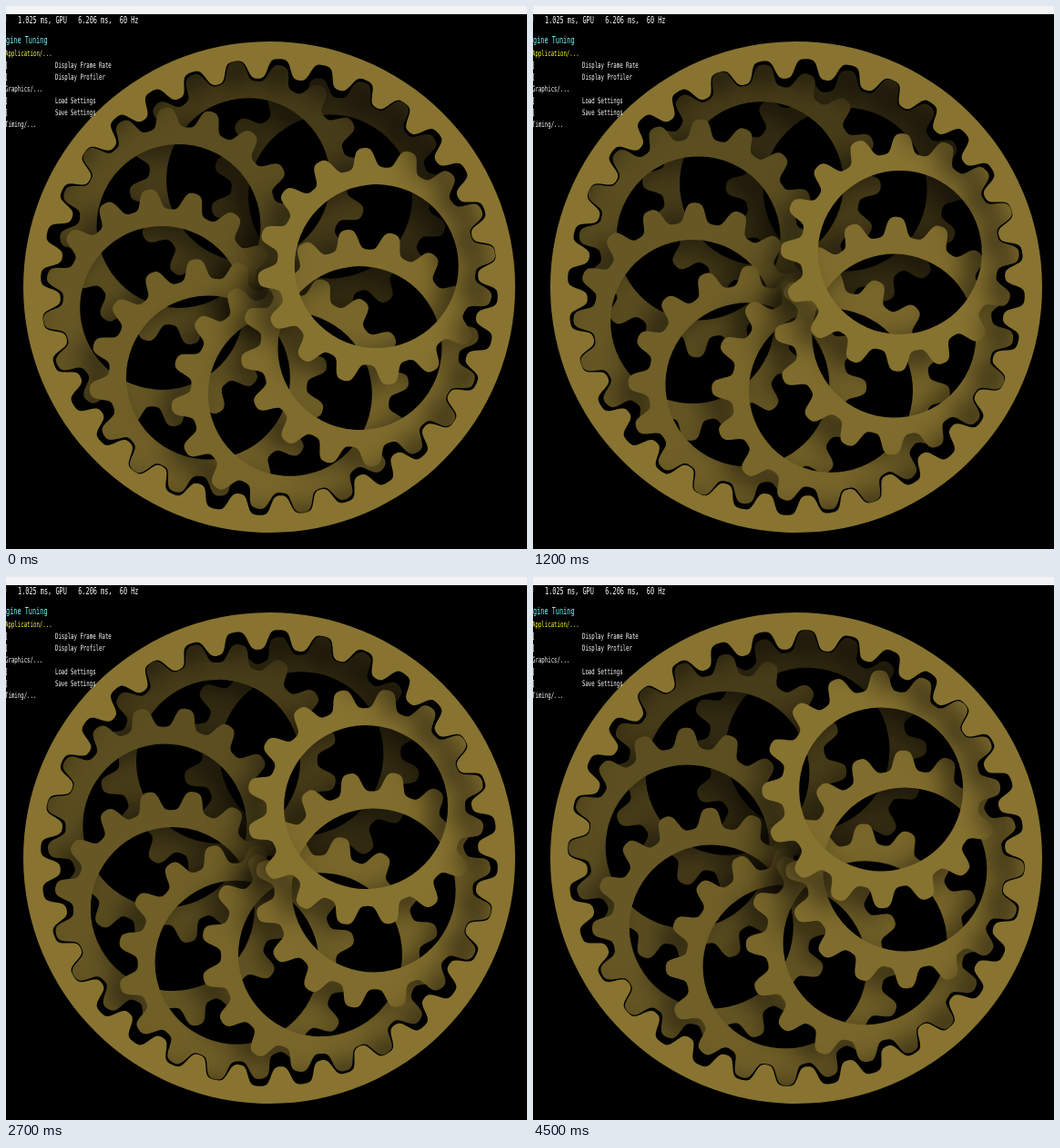
Write an HTML page with a canvas that moves like this. It is 572 px wide and 597 px high and loops after 4600 ms.

```html
<!DOCTYPE html>
<html>
<head>
<meta charset="utf-8">
<style>
html, body { margin: 0; width: 100%; height: 100%; overflow: hidden; background: #000; }
canvas, svg { position: absolute; left: 0; top: 0; }
text { font-family: "DejaVu Sans Mono", monospace; font-size: 8.8px; fill: #fff; white-space: pre; }
.big { font-size: 10.6px; }
</style>
</head>
<body>
<canvas width="572" height="597"></canvas>
<svg width="572" height="597">
  <rect width="572" height="9" fill="#f3f3f5"/>
  <g transform="scale(.65 1)">
    <text class="big" x="-5.5" y="19">U   1.025 ms, GPU   6.206 ms,  60 Hz</text>
    <text class="big" x="0" y="41" style="fill:#7ff">gine Tuning</text>
    <text x="-1.5" y="55" style="fill:#ff3">Application/...</text>
    <text x="-2" y="68">[</text><text x="83" y="68">Display Frame Rate</text>
    <text x="-2" y="81">[</text><text x="83" y="81">Display Profiler</text>
    <text x="-1.5" y="94">Graphics/...</text>
    <text x="-2" y="107">[</text><text x="83" y="107">Load Settings</text>
    <text x="-2" y="120">[</text><text x="83" y="120">Save Settings</text>
    <text x="-1.5" y="133">Timing/...</text>
  </g>
</svg>
<script>
const ctx = document.querySelector('canvas').getContext('2d');
const TAU = Math.PI * 2, RAD = Math.PI / 180;
const CX = 289, CY = 309, ORBIT = 120, PHASE = 2.6;
const LOOP = 4600, STEP = 100, SPEED = -6.23; // degrees per second
const COLOR = [136, 116, 48];
const LIGHT = [.99, .94, .88, .82, .75, .67, .53, .38]; // front to back

// Toothed outline plus a plain circle, filled with the even-odd rule.
function gear(teeth, pitch, height, bias, circle) {
  const path = new Path2D(), n = teeth * 28;
  for (let i = 0; i < n; i++) {
    const a = i / n * TAU;
    const r = pitch + height * Math.tanh(1.8 * (Math.cos(teeth * a) + bias)) / Math.tanh(1.8);
    path.lineTo(r * Math.cos(a), r * Math.sin(a));
  }
  path.closePath();
  path.moveTo(circle, 0);
  path.arc(0, 0, circle, 0, TAU);
  return path;
}

const planet = gear(16, 120, 11, -.08, 90);
const ring = gear(32, 240, 10.8, .12, 270);

function draw(path, x, y, angle, light, reach) {
  ctx.save();
  ctx.translate(x, y);
  ctx.rotate(angle * RAD);
  ctx.shadowColor = 'rgba(0,0,0,.55)';
  ctx.shadowBlur = 28;
  ctx.shadowOffsetX = -reach;
  ctx.shadowOffsetY = reach * .5;
  ctx.fillStyle = `rgb(${COLOR.map(c => Math.round(c * light))})`;
  ctx.fill(path, 'evenodd');
  ctx.restore();
}

function frame(now) {
  const t = Math.floor(now % LOOP / STEP) * STEP;
  ctx.fillStyle = '#000';
  ctx.fillRect(0, 0, 572, 597);
  for (let k = 7; k >= 0; k--) {
    const a = -11 + SPEED * t / 1000 + 45 * k;
    // Rolling inside a ring twice its size, a gear spins against its orbit.
    draw(planet, CX + ORBIT * Math.cos(a * RAD), CY + ORBIT * Math.sin(a * RAD),
      2 * PHASE - a, LIGHT[k], 18);
  }
  draw(ring, CX, CY, PHASE, 1, 26);
  requestAnimationFrame(frame);
}
requestAnimationFrame(frame);
</script>
</body>
</html>
```
